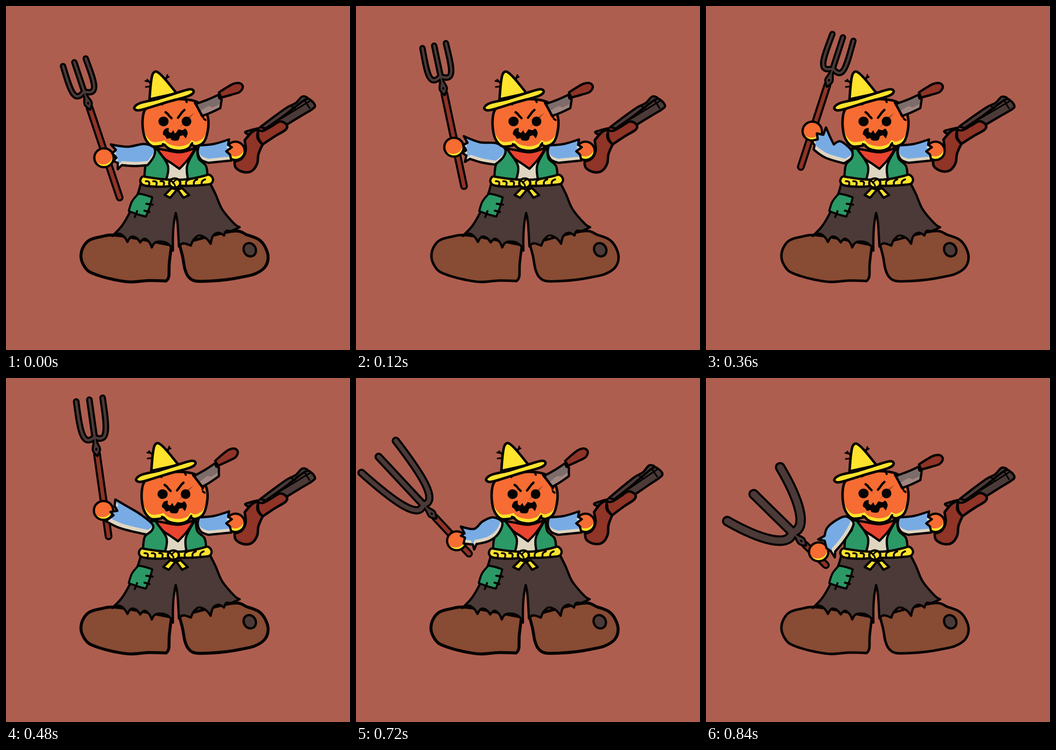
An HTML page with a canvas for the animation above (0.96 s loop, 748x748 px).

```html
<!DOCTYPE html>
<html lang="en">
<head>
<meta charset="utf-8">
<title>Scarecrow</title>
<style>
html, body { margin: 0; height: 100%; overflow: hidden; background: #ae5e4f; }
canvas { display: block; width: 100vw; height: 100vh; }
</style>
</head>
<body>
<canvas id="stage" width="748" height="748"></canvas>
<script>
const ctx = document.getElementById('stage').getContext('2d');
const STEP = 120;
const C = {
  bg: '#ae5e4f', ink: '#050303', orange: '#f76c32', yellow: '#ffe32c', blue: '#78abe4',
  dark: '#4b3a37', boot: '#884b33', wood: '#8f3426', green: '#2b9965', red: '#e9442f',
  cream: '#dfd6c1', steel: '#7d6d6a', shine: '#a18580', scar: '#a84c2c'
};

// Smooth path through "x,y" points; "!" marks a sharp corner.
function curve(text, open) {
  const pts = text.split(' ').map(t => {
    const [x, y] = t.split(',').map(parseFloat);
    return { x, y, sharp: t.endsWith('!') };
  });
  const n = pts.length, at = i => pts[(i + n) % n];
  const tangent = i => {
    const end = open && (i === 0 || i === n - 1);
    if (at(i).sharp || end) return [0, 0];
    return [(at(i + 1).x - at(i - 1).x) / 6, (at(i + 1).y - at(i - 1).y) / 6];
  };
  const path = new Path2D();
  path.moveTo(pts[0].x, pts[0].y);
  for (let i = 0; i < (open ? n - 1 : n); i++) {
    const a = at(i), b = at(i + 1), u = tangent(i), v = tangent((i + 1) % n);
    path.bezierCurveTo(a.x + u[0], a.y + u[1], b.x - v[0], b.y - v[1], b.x, b.y);
  }
  if (!open) path.closePath();
  return path;
}

function oval(x, y, rx, ry, turn = 0) {
  const path = new Path2D();
  path.ellipse(x, y, rx, ry, turn, 0, Math.PI * 2);
  return path;
}

function fill(path, color) {
  ctx.fillStyle = color;
  ctx.fill(path);
}

function line(path, width = 5, color = C.ink) {
  ctx.lineWidth = width;
  ctx.strokeStyle = color;
  ctx.stroke(path);
}

function shape(path, color, width = 5) {
  fill(path, color);
  line(path, width);
}

// Fill with a rim colour showing where the shifted main colour does not reach.
function shaded(path, color, rim, dx, dy, width = 5) {
  fill(path, rim);
  ctx.save();
  ctx.clip(path);
  ctx.translate(dx, dy);
  fill(path, color);
  ctx.restore();
  line(path, width);
}

function group(draw, dx = 0, dy = 0, deg = 0, px = 0, py = 0) {
  ctx.save();
  ctx.translate(px + dx, py + dy);
  ctx.rotate(deg * Math.PI / 180);
  ctx.translate(-px, -py);
  draw();
  ctx.restore();
}

const P = {
  bootL: curve('245,499 205,502 180,510 167,526 163,545 168,562 180,577 204,587 235,595 270,600 310,597 348,598! 354,588 355,560 360,520!'),
  bootR: curve('377,518! 384,545 389,572 397,589 412,598 445,598 480,595 510,590 540,583 562,569 570,548 564,525 550,508 525,498 490,490'),
  button: oval(530, 530, 13, 15, -0.5),
  pants: curve('293,386! 286,410 270,447 252,478 231,500! 246,495 257,502 264,513! 272,502 283,504 292,514! 301,506 311,513 317,525! 325,514 343,513 357,521 363,532! 363,500 365,472 369,450! 373,472 376,523! 385,516 402,521! 408,508 420,499 435,505 445,517! 450,500 462,493 474,499! 479,489 490,489 508,481! 496,473 470,442 456,410 444,386!'),
  patch: curve('288,408! 303,411 318,416! 312,438 304,458! 286,453 267,446! 274,425'),
  shirt: curve('348,335! 396,335! 396,378! 346,378!'),
  vestL: curve('318,310! 317,330 304,346 301,376! 348,378! 352,347 328,310!'),
  vestR: curve('413,310! 394,347 396,378! 438,374! 435,348 419,332 416,310!'),
  scarf: curve('328,310! 345,313 380,318 412,308! 404,322 393,337 377,354! 360,342 344,331'),
  belt: curve('292,379 297,371 307,372 335,376 368,378 400,376 428,370 442,367 450,376 446,386 430,389 400,391 368,391 335,393 305,391 295,387'),
  knot: oval(367, 385, 12, 10),
  tailL: curve('360,396! 345,411! 357,417! 372,399!'),
  tailR: curve('373,399! 386,417! 398,411! 383,396!'),
  head: curve('302,226 297,248 299,276 306,294 318,305 333,305 345,302! 356,311 378,315 396,310 403,301! 414,305 430,296 438,275 440,248 433,226 418,210 390,203 350,205 318,214'),
  scar: curve('410,232! 394,251! 377,264! 395,242!'),
  mouth: curve('341,278 345,268 354,265! 354,273 359,276! 364,270! 368,277 375,268! 384,270 390,267 395,276 391,288! 385,281! 378,283! 374,292 361,292 358,287! 350,289! 346,283'),
  cone: curve('312,203! 315,168 319,148 328,143 344,157 371,190!'),
  brim: curve('279,221 292,211 330,202 368,190 400,181 408,187 396,196 350,209 305,223 286,227'),
  blade: curve('413,213! 440,203 462,193! 464,201! 469,203! 466,222! 445,232 426,239!'),
  bladeEdge: curve('420,230! 440,218 450,220 469,211! 468,222! 426,239!'),
  grip: curve('463,188! 480,177 495,169 509,168 515,176 508,187 490,193 468,199!'),
  stock: curve('497,338! 500,352 516,361 534,359 546,343 549,322 558,301! 547,287 549,268! 535,274 519,292! 521,315 512,332'),
  forend: curve('548,270! 560,271 578,261 596,251 610,258 608,269 585,283 558,301! 549,288'),
  hammer: curve('520,274 532,270 548,266! 530,279'),
  barrelTop: curve('552,264! 585,239 612,220 630,211 644,197 656,201 645,213 570,267!'),
  barrel: curve('568,264! 605,238 650,204 664,206 672,217 665,225 640,240 609,259! 596,251 579,261'),
  sleeveR: curve('420,303! 452,300 485,290! 483,302! 491,307! 479,316! 487,323! 490,336! 440,341! 424,334 417,318'),
  cuffR: curve('420,302! 455,298 487,295! 488,333! 455,332 424,336! 416,318')
};

const sleeves = [
  ['322,308 300,300 265,306 228,301! 239,313! 231,320! 240,330! 233,337! 243,341! 243,355! 252,346! 280,348 308,346! 322,326', 0, -9],
  ['318,318 292,293 264,273 243,258! 240,272! 245,283! 230,284! 236,292! 218,303! 250,322 304,340! 317,331', 4, -10],
  ['318,317 306,303 291,294 278,301! 270,285 261,264! 255,280! 241,277! 243,290! 230,293! 236,303! 234,312! 260,330 300,342! 316,331', 3, -10],
  ['318,314 298,303 275,312 257,328 228,323! 236,338! 228,343! 237,347! 234,360! 254,362! 257,373! 262,361! 290,354 310,338', -4, -9],
  ['320,313 304,301 285,308 264,325 258,343! 244,351! 258,354! 262,370! 271,376! 280,390! 281,377! 299,356 317,328', -7, -7]
].map(([text, dx, dy]) => ({ path: curve(text), dx, dy }));

// sleeve, sleeve turn, hand x/y, fork x/y, fork turn, shaft, tine length, spread, tine width
const poses = [
  [0, 0, 213, 330, 182, 222, -18.5, 205, 105, 26, 5],
  [0, 13, 213, 307, 192, 190, -12, 206, 106, 26, 5],
  [1, 0, 218, 279, 206, 160, -7, 207, 106, 26, 5],
  [2, 0, 231, 272, 264, 172, 18, 187, 109, 24, 5],
  [1, -5, 212, 288, 198, 166, -8, 180, 120, 29, 5.5],
  [0, 0, 215, 330, 163, 238, -31, 153, 134, 33, 6],
  [3, 0, 219, 354, 172, 303, -43, 108, 180, 51, 9],
  [4, 0, 245, 378, 215, 362, -45.5, 64, 156, 82, 14]
];
const gunTurn = [0, 0, 0, 1, 0, 0, -3, -0.7];

function fork(x, y, turn, shaft, tall, spread, tine) {
  group(() => {
    const wood = new Path2D(`M0,0V${shaft}`);
    line(wood, 17);
    line(wood, 8, C.wood);
    const side = s => `M${s * spread},${-tall}C${s * (spread * 0.6 + 12)},${-tall / 2} ${s * 30},-18 0,-38`;
    const tines = new Path2D(`${side(-1)}${side(1)}M0,${-tall}V-38`);
    line(tines, tine + 9);
    shape(curve('-4,-38! 4,-38! 4,-26 8,-10 0,4! -8,-10 -4,-26'), C.dark, 4.5);
    line(tines, tine, C.dark);
    fill(oval(0, -11, 2.5, 3), C.ink);
  }, x, y, turn);
}

function legs(width) {
  shape(P.bootL, C.boot, width);
  shape(P.bootR, C.boot, width);
  shape(P.button, C.dark);
  shape(P.pants, C.dark);
  shape(P.patch, C.green, 4.5);
  line(new Path2D('M305,430L319,432M301,445L312,448M285,446L280,459'), 4.5);
}

function torso() {
  fill(P.shirt, C.cream);
  shape(P.vestL, C.green);
  shape(P.vestR, C.green);
  shape(P.scarf, C.red);
}

function belt() {
  shape(P.belt, C.yellow);
  const twist = new Path2D();
  for (const x of [309, 325, 341, 394, 411, 428]) {
    const s = x < 368 ? 1 : -1;
    twist.moveTo(x - 5 * s, x < 368 ? 381 : 377);
    twist.quadraticCurveTo(x + 5 * s, 380, x + 2 * s, 389);
  }
  line(twist, 4);
  shape(P.tailL, C.yellow);
  shape(P.tailR, C.yellow);
  shape(P.knot, C.yellow);
  line(new Path2D('M358,380Q366,383 368,393M372,377Q365,380 363,385'), 3.5);
}

function head() {
  shaded(P.head, C.orange, C.yellow, 0, -10, 5.5);
  line(new Path2D('M337,208L340,214M390,203L393,209M433,232L429,240M430,245L434,248M345,302L341,300M403,301L405,298'), 4.5);
  fill(P.scar, C.scar);
  fill(oval(342.5, 251, 11, 10.5), C.ink);
  fill(oval(392.5, 251, 10.5, 10.5), C.ink);
  line(new Path2D('M347,231Q352,234 354,238L360,244M388,226Q383,230 380,235L374,243'), 5);
  fill(P.mouth, C.ink);
}

function hat() {
  line(new Path2D('M303,163L314,165M304,176L313,175M307,160L314,168M346,157L354,154M348,160L351,150'), 3.5);
  shape(P.cone, C.yellow, 5.5);
  shape(P.brim, C.yellow, 5.5);
}

function knife() {
  fill(P.blade, C.steel);
  fill(P.bladeEdge, C.shine);
  line(P.blade);
  shape(P.grip, C.wood);
  line(new Path2D('M411,211L428,241'), 5);
}

function gun() {
  shape(P.hammer, C.dark);
  shape(P.barrelTop, C.dark);
  shape(P.barrel, C.dark);
  line(new Path2D('M598,245L660,207M650,206L660,222M620,217L628,223'), 3.5);
  shape(P.stock, C.wood, 5.5);
  shape(P.forend, C.wood, 5.5);
}

function rightArm(roundCuff) {
  if (roundCuff) {
    shaded(P.cuffR, C.blue, C.cream, 2, -12);
    shaded(oval(503, 312, 19, 21), C.orange, C.yellow, 1, -7);
  } else {
    shaded(oval(499, 315, 20, 20), C.orange, C.yellow, -1, -8);
    shaded(P.sleeveR, C.blue, C.cream, 0, -9);
  }
}

function draw(step) {
  const [kind, turn, hx, hy, ...tool] = poses[step];
  const lean = step > 0 && step % 2 === 0;
  const lx = lean ? -3 : 0;
  ctx.fillStyle = C.bg;
  ctx.fillRect(0, 0, 748, 748);
  ctx.lineJoin = ctx.lineCap = 'round';

  group(() => legs(step % 2 ? 5.5 : 6.5), step % 2 ? 1 : 0);
  group(torso, lx, lean ? 1 : 0);
  group(gun, step === 3 ? -3 : 0, step === 3 ? -2 : 0, gunTurn[step], 510, 320);
  rightArm(step === 2);

  fork(...tool);
  shaded(oval(hx, hy, 21, 20.5), C.orange, C.yellow, -2, -6);
  const sleeve = sleeves[kind];
  group(() => shaded(sleeve.path, C.blue, C.cream, sleeve.dx, sleeve.dy), 0, 0, turn, 310, 320);

  group(belt, lx, 0);
  group(head, lx + (lean ? 1 : 0), lean ? 1.5 : 0);
  group(knife, lean ? -4 : 0, 0, lean ? -9 : 0, 413, 212);
  group(hat, lean ? 4 : 0, lean ? -1 : 0);
}

let shown = -1;
const start = performance.now();
function tick(now) {
  const step = Math.floor(Math.max(0, now - start) / STEP) % poses.length;
  if (step !== shown) draw(shown = step);
  requestAnimationFrame(tick);
}
tick(start);
</script>
</body>
</html>
```
